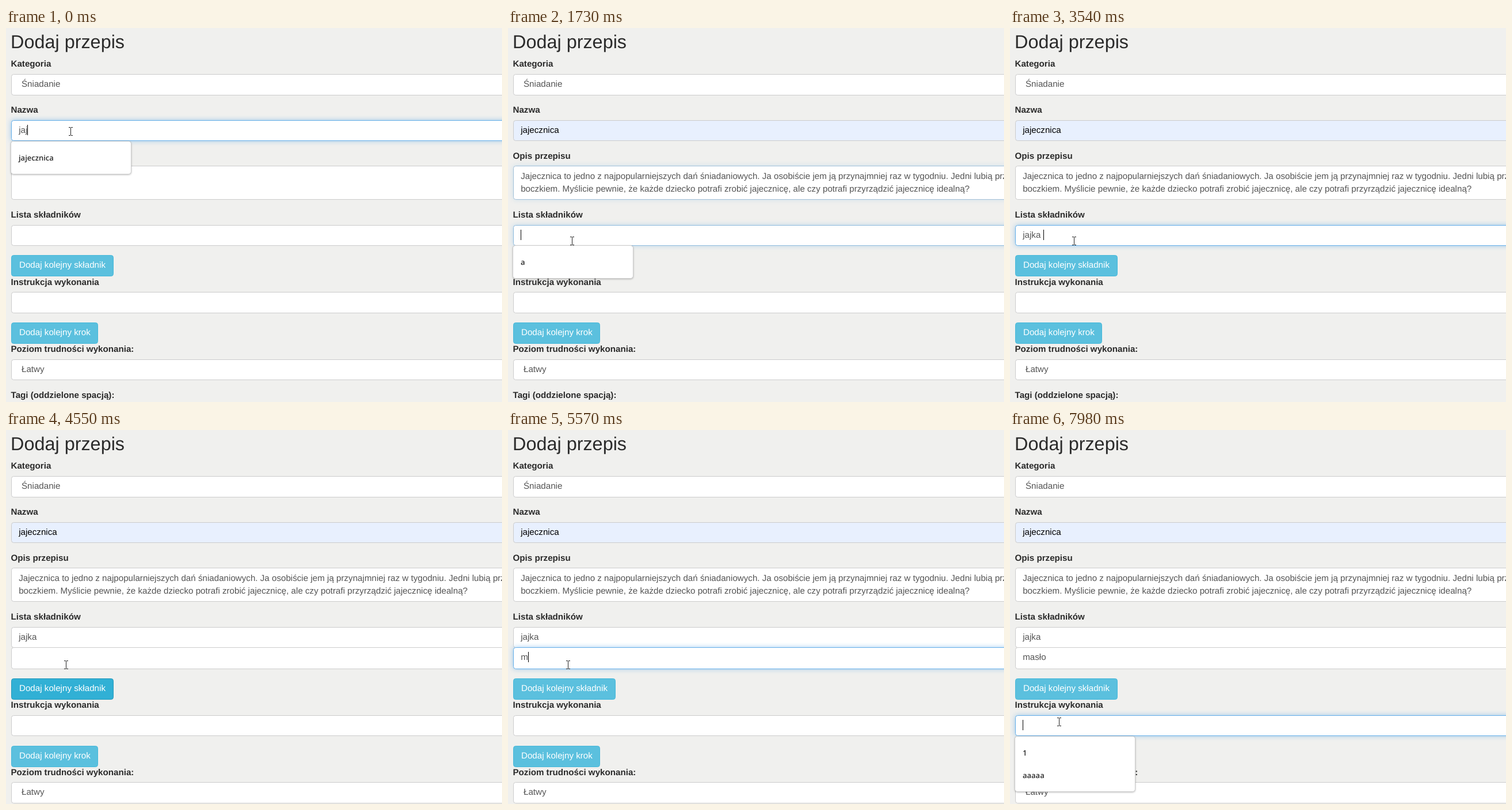
An HTML page that plays this animation: 862x649 px, repeating every 8 s.

```html
<!DOCTYPE html>
<html lang="pl">
<head>
<meta charset="utf-8">
<title>Dodaj przepis</title>
<style>
html, body { margin: 0; width: 100%; height: 100%; overflow: hidden; background: #f0f0ee; }
body { position: relative; font: 15.16px/22px "Liberation Sans", Arial, sans-serif; color: #555; text-rendering: geometricPrecision; }
div, svg { position: absolute; box-sizing: border-box; white-space: pre; }
h2 { position: absolute; left: 8px; top: 4px; margin: 0; font-size: 32.4px; line-height: 40px; font-weight: 400; color: #2b2b2b; }
.label { left: 8.5px; font-weight: 700; color: #2b2b2b; }
.field { left: 9px; width: 900px; padding-left: 12.2px; background: #fff; border: 1px solid #ccc; border-radius: 4.4px; line-height: 34.4px; }
.area { line-height: 21.6px; padding-top: 6.6px; }
.select { padding-left: 17px; }
.filled { background: #e8f0fe; color: #000; }
.caret { display: inline-block; width: 1px; height: 18px; margin-right: -1px; vertical-align: -4px; background: #000; }
.button { left: 9px; height: 37px; padding-left: 13px; background: #5bc0de; border: 1px solid #46b8da; border-radius: 4.4px; line-height: 34.4px; color: #fff; }
.pressed { background: #31b0d5; border-color: #269abc; }
.popup { left: 8px; width: 210px; background: #fff; border: 1px solid #ccc; border-radius: 5px; box-shadow: 0 1px 3px rgba(0,0,0,.25); font: 600 13px/39px "Open Sans", "Noto Sans", sans-serif; color: #2b2b2b; padding: 8.5px 0; }
.popup p { margin: 0; padding-left: 13px; height: 39px; }
.popup .hover { background: #ededed; }
svg { overflow: visible; width: 1px; height: 1px; }
</style>
</head>
<body>
<script>
const LOOP = 8000, ROW = 36.4;
const ABOUT = `Jajecznica to jedno z najpopularniejszych dań śniadaniowych. Ja osobiście jem ją przynajmniej raz w tygodniu. Jedni lubią przyrządzać ją z
boczkiem. Myślicie pewnie, że każde dziecko potrafi zrobić jajecznicę, ale czy potrafi przyrządzić jajecznicę idealną?`;

const POINTERS = {
  beam: '<path d="M-3-6.5h3M1-6.5h3M.5-6V7M-3 7.5h3M1 7.5h3" stroke="#222" fill="none"/>',
  arrow: '<path d="M0 0V16l4-4 2.5 6 2.5-1-2.5-6H12z" fill="#fff" stroke="#000"/>',
  hand: '<path d="M-1.5 0q1.5-2 3 0v6l6 1.5q2 .5 1.5 3L8 17H0l-5-7q0-2 3.5 0z" fill="#fff" stroke="#000"/>'
};

// Each step changes only the listed parts; glow values run from 0 to 1.
const steps = [
  [0, { name: 'jaj', about: '', eggs: '', butter: '', glow: { name: 1 }, caret: 'name', popup: 'name', pointer: 'beam', x: 112, y: 179 }],
  [150, { y: 189 }],
  [280, { pointer: 'arrow', x: 108, y: 218, hover: true }],
  [410, { name: 'jajecznica', filled: true, popup: '', x: 106, y: 224 }],
  [540, { x: 104, y: 248, pointer: 'beam' }],
  [670, { x: 103, y: 270 }],
  [800, { y: 281, caret: 'about' }],
  [920, { glow: { name: .5, about: .5 } }],
  [1050, { glow: { about: 1 }, about: ABOUT }],
  [1190, { x: 106, y: 320, pointer: 'arrow' }],
  [1340, { x: 110, y: 354, pointer: 'beam' }],
  [1470, { x: 111, y: 369 }],
  [1600, { caret: 'eggs' }],
  [1730, { glow: { about: .4, eggs: .6 }, popup: 'eggs', hover: false }],
  [1880, { glow: { eggs: 1 } }],
  [2310, { caret: '' }],
  [2590, { eggs: 'j', caret: 'eggs', popup: '' }],
  [2720, { eggs: 'ja' }],
  [2890, { eggs: 'jaj' }],
  [3070, { eggs: 'jajk' }],
  [3240, { eggs: 'jajka' }],
  [3540, { eggs: 'jajka ' }],
  [3820, { x: 109, y: 382 }],
  [3960, { x: 106, y: 400, pointer: 'hand', pressed: true }],
  [4100, { x: 104, y: 407 }],
  [4240, { caret: '', glow: { eggs: .5 } }],
  [4380, { glow: {}, extra: true }],
  [4520, { pointer: 'beam' }],
  [4930, { caret: 'butter', pressed: false }],
  [5050, { glow: { butter: 1 }, popup: 'butter' }],
  [5570, { butter: 'm', popup: '' }],
  [5820, { butter: 'ma' }],
  [6130, { butter: 'mas' }],
  [6410, { butter: 'masł' }],
  [6560, { butter: 'masło' }],
  [7150, { x: 102, y: 416, pointer: 'arrow' }],
  [7320, { x: 94, y: 458 }],
  [7490, { x: 86, y: 502, pointer: 'beam' }],
  [7650, { x: 85, y: 506, caret: 'guide' }],
  [7820, { glow: { butter: .5, guide: .5 }, popup: 'guide' }],
  [7980, { glow: { guide: 1 } }]
];

const label = (y, text) => `<div class="label" style="top:${y - 11}px">${text}</div>`;
const box = (y, text, kind = '', height = ROW, style = '') =>
  `<div class="field ${kind}" style="top:${y}px;height:${height}px;${style}">${text}</div>`;
const button = (y, width, text, kind = '') =>
  `<div class="button ${kind}" style="top:${y}px;width:${width}px">${text}</div>`;

function input(s, key, y, kind, height) {
  const g = s.glow[key] || 0;
  const style = g ? `border-color:color-mix(in srgb,#66afe9 ${g * 100}%,#ccc);box-shadow:0 0 8px rgba(102,175,233,${g * .6});` : '';
  const caret = s.caret === key ? '<i class="caret"></i>' : '';
  return box(y, (s[key] || '') + caret, kind, height, style);
}

function popup(s) {
  const [y, items] = {
    name: [196, ['jajecznica']],
    eggs: [377, ['a']],
    butter: [414, ['a']],
    guide: [531, ['1', 'aaaaa']]
  }[s.popup];
  const rows = items.map(item => `<p class="${s.hover ? 'hover' : ''}">${item}</p>`).join('');
  return `<div class="popup" style="top:${y}px;height:${19 + 39 * items.length}px">${rows}</div>`;
}

function render(s) {
  const d = s.extra ? ROW : 0;
  document.body.innerHTML = '<h2>Dodaj przepis</h2>' +
    label(63, 'Kategoria') + box(79.8, 'Śniadanie', 'select', 37) +
    label(143, 'Nazwa') + input(s, 'name', 160, s.filled ? 'filled' : '') +
    label(223, 'Opis przepisu') + input(s, 'about', 239.4, 'area', 58.6) +
    label(325, 'Lista składników') + input(s, 'eggs', 341.6) +
    (s.extra ? input(s, 'butter', 377.4, '', 37.2) : '') +
    button(394.4 + d, 178, 'Dodaj kolejny składnik', s.pressed ? 'pressed' : '') +
    label(441.6 + d, 'Instrukcja wykonania') + input(s, 'guide', 458.2 + d) +
    button(511.2 + d, 151, 'Dodaj kolejny krok') +
    label(558.2 + d, 'Poziom trudności wykonania:') + box(574.8 + d, 'Łatwy', 'select') +
    label(637.6 + d, 'Tagi (oddzielone spacją):') +
    (s.popup ? popup(s) : '') +
    `<svg style="left:${s.x}px;top:${s.y}px">${POINTERS[s.pointer]}</svg>`;
}

let shown = -1;
function tick() {
  const t = performance.now() % LOOP;
  const count = steps.filter(([at]) => at <= t).length;
  if (count !== shown) {
    shown = count;
    render(Object.assign({}, ...steps.slice(0, count).map(step => step[1])));
  }
  requestAnimationFrame(tick);
}
tick();
</script>
</body>
</html>
```
